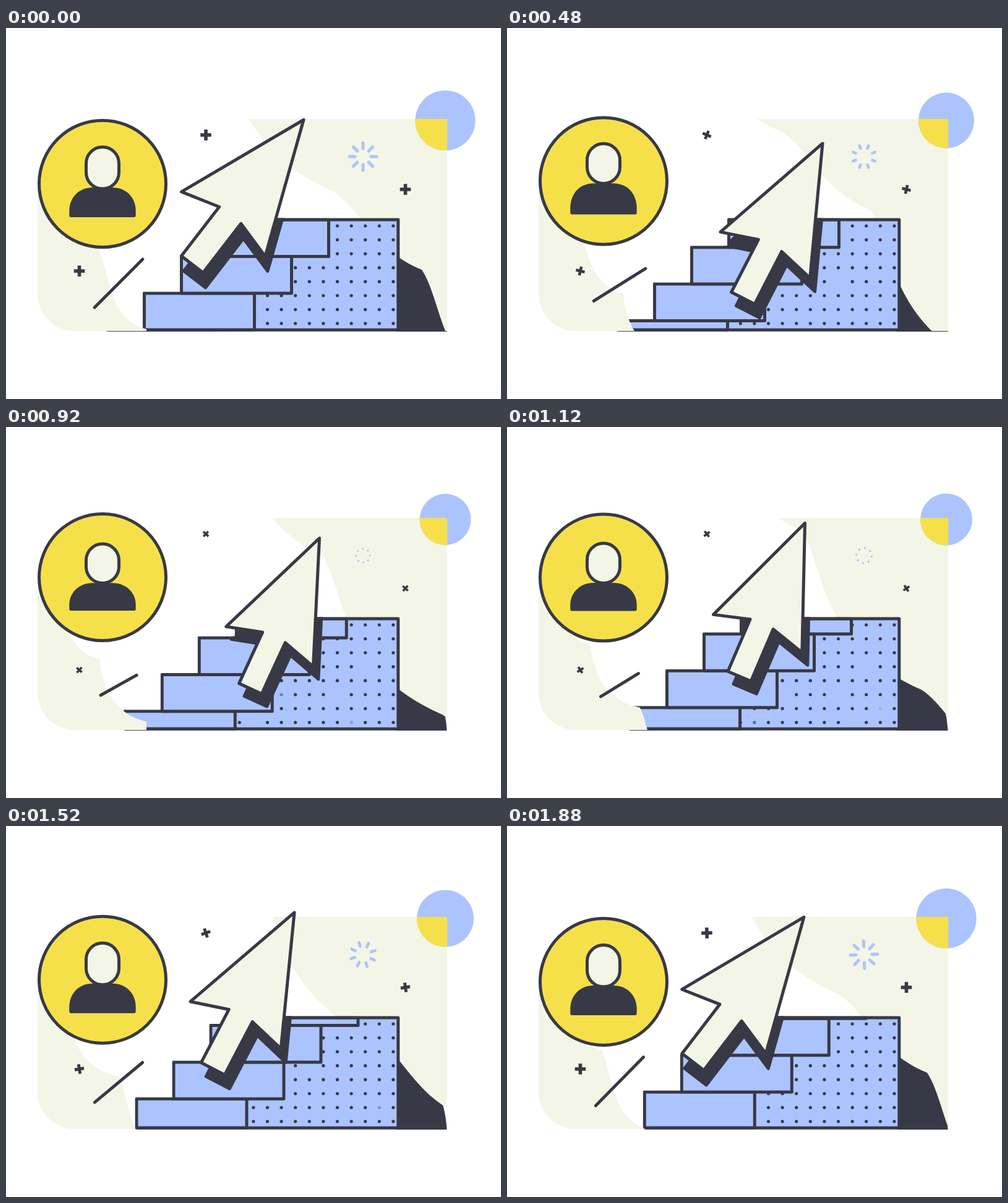
Write an HTML page with a canvas that moves like this. It is 800 px wide and 600 px high and loops after 1920 ms.

```html
<!DOCTYPE html>
<html lang="en">
<head>
<meta charset="utf-8">
<title>Climbing arrow</title>
<style>
  html, body { margin: 0; width: 100%; height: 100%; overflow: hidden; background: #fff; }
  canvas { display: block; }
</style>
</head>
<body>
<canvas id="stage" width="800" height="600"></canvas>
<script>
const ctx = document.getElementById('stage').getContext('2d');
const LOOP = 1920, LINE = 5, TURN = 2 * Math.PI;
const CREAM = '#f3f5e6', BLUE = '#abc4ff', YELLOW = '#f6e04a', DARK = '#383946';
const TOP = 310, BASE = 488.3, RIGHT = 633.8, RISE = 59.4;

let time = 0, phase = 0, wave = 1;

// Looping motion: a mean plus one slow and one fast swing.
const swing = (mean, c1, s1, c2, s2) => {
  const a = TURN * phase;
  return mean + c1 * Math.cos(a) + s1 * Math.sin(a) + c2 * Math.cos(2 * a) + s2 * Math.sin(2 * a);
};
const clamp = v => Math.max(0, Math.min(1, v));

function paint(fill, stroke, width = LINE) {
  if (fill) { ctx.fillStyle = fill; ctx.fill(); }
  if (stroke) { ctx.strokeStyle = stroke; ctx.lineWidth = width; ctx.stroke(); }
}

function disc(x, y, r, fill, stroke) {
  ctx.beginPath();
  ctx.arc(x, y, r, 0, TURN);
  paint(fill, stroke);
}

function line(x1, y1, x2, y2, color = DARK, width = LINE) {
  ctx.beginPath();
  ctx.moveTo(x1, y1);
  ctx.lineTo(x2, y2);
  paint(null, color, width);
}

function isolated(draw) {
  ctx.save();
  draw();
  ctx.restore();
}

// Ground with a scalloped edge that slides up and left by two scallops per loop.
// Each scallop is a cubic curve relative to its start; farX is the filled side.
function ground(x, y, scallops, farX) {
  const dx = scallops[0][4] + scallops[1][4], dy = scallops[0][5] + scallops[1][5];
  x -= dx * (phase + 1);
  y -= dy * (phase + 1);
  ctx.beginPath();
  ctx.moveTo(farX, y);
  ctx.lineTo(x, y);
  for (let i = 0; i < 6; i++) {
    const [ax, ay, bx, by, ex, ey] = scallops[i % 2];
    ctx.bezierCurveTo(x + ax, y + ay, x + bx, y + by, x + ex, y + ey);
    x += ex;
    y += ey;
  }
  ctx.lineTo(farX, y);
  paint(CREAM);
}

function rightGround() {
  // The dark dome shows wherever the cream leaves it bare.
  ctx.beginPath();
  ctx.moveTo(630, 491);
  ctx.lineTo(630, 360);
  ctx.bezierCurveTo(680, 383, 709, 430, 712.5, 491);
  paint(DARK);
  isolated(() => {
    ctx.beginPath();
    ctx.rect(300, 147, 413, 343);
    ctx.clip();
    ground(530, 265, [[45, 30, 62, 93, 142, 126], [38, 58, 26, 184, 194, 258]], 1200);
  });
}

function leftGround() {
  isolated(() => {
    ctx.beginPath();
    ctx.roundRect(51, 250, 176, 240, [0, 0, 0, 60]);
    ctx.clip();
    ground(227, 487, [[5, 50, 25, 90, 80, 102], [20, 40, 15, 114, 78, 130]], -300);
  });
}

function cornerDisc() {
  const r = 45 + 3.6 * wave;
  disc(710, 149.5, r, BLUE);
  isolated(() => {
    ctx.beginPath();
    ctx.rect(600, 147, 113, 100);
    ctx.clip();
    disc(710, 149.5, r, YELLOW);
  });
}

function spinner() {
  const grow = 1 - ((1 - wave) / 2) ** 2;
  const outer = 12.5 + 12 * grow, inner = outer - 3.1 - 11 * grow * grow;
  const cap = 1.5 + grow;
  isolated(() => {
    ctx.translate(577, 208);
    ctx.rotate(phase * TURN / 4);
    for (let i = 0; i < 8; i++) {
      line(inner + cap, 0, outer - cap, 0, BLUE, 2 * cap);
      ctx.rotate(TURN / 8);
    }
  });
}

function plus(x, y, turn) {
  isolated(() => {
    const s = .82 + .18 * wave;
    ctx.translate(x, y);
    ctx.rotate(turn * TURN / 4);
    ctx.scale(s, s);
    ctx.lineCap = 'butt';
    line(-8.8, 0, 8.8, 0, DARK, 5.6);
    line(0, -8.8, 0, 8.8, DARK, 5.6);
  });
}

const steps = () => [0, 1, 2, 3].map(k => {
  const y = BASE - RISE * (k + phase);
  return { x: 163.5 + 60 * (k + phase), top: Math.max(TOP, y), bottom: Math.min(BASE, y + RISE) };
});

function clipToStairs() {
  ctx.beginPath();
  for (const s of steps()) ctx.rect(s.x - 2.5, s.top - 2.5, RIGHT + 5 - s.x, BASE + 5 - s.top);
  ctx.clip();
}

// A fixed grid of dots; a few chosen by a seeded generator blink once per loop.
function dots() {
  let seed = 11;
  const random = () => (seed = seed * 16807 % 2147483647) / 2147483647;
  for (let i = -2; i < 10; i++) for (let j = 0; j < 8; j++) {
    const blinks = random() < .15, middle = 400 + 1150 * random();
    ctx.globalAlpha = blinks ? clamp((Math.abs(time - middle) - 150) / 200) : 1;
    disc(422.5 + 22.6 * i, 320 + 22.55 * j, 2.6, DARK);
  }
  ctx.globalAlpha = 1;
}

function stairs() {
  const all = steps();
  isolated(() => {
    clipToStairs();
    ctx.fillStyle = BLUE;
    ctx.fillRect(0, TOP, RIGHT, BASE - TOP);
    dots();
    for (const s of all) {
      ctx.beginPath();
      ctx.rect(s.x, s.top, 178, s.bottom - s.top);
      paint(BLUE, DARK);
    }
  });
  ctx.beginPath();
  ctx.moveTo(all[3].x, TOP);
  ctx.lineTo(RIGHT, TOP);
  ctx.lineTo(RIGHT, BASE);
  ctx.lineTo(all[0].x + 2, BASE);
  paint(null, DARK);
}

function avatar() {
  const cy = 247.5 + 4.5 * wave;
  // One hop in the middle of the loop, with a squash at both ends of it.
  const hop = -Math.sin(TURN * clamp((time - 400) / 800));
  const squash = 2.5 * Math.abs(hop);
  const headTop = cy - 59.5 + 4.2 * hop + squash, headBottom = cy + 8 + 4.2 * hop - squash;
  const top = cy + 6 + 4 * hop, bottom = cy + 54;
  disc(156, cy, 102.5, YELLOW, DARK);

  ctx.beginPath();
  ctx.moveTo(105, bottom);
  ctx.quadraticCurveTo(102.3, bottom, 102.3, bottom - 3);
  ctx.lineTo(102.3, bottom - 10);
  ctx.bezierCurveTo(102.3, top + 16, 118, top, 140, top);
  ctx.lineTo(172, top);
  ctx.bezierCurveTo(194, top, 209.7, top + 16, 209.7, bottom - 10);
  ctx.lineTo(209.7, bottom - 3);
  ctx.quadraticCurveTo(209.7, bottom, 207, bottom);
  paint(DARK);

  ctx.beginPath();
  ctx.roundRect(129.5, headTop, 53, headBottom - headTop, 26.5);
  paint(CREAM, DARK);
}

function slash() {
  const y = 415.3 - 2.3 * wave;
  const dx = swing(36.8, 5.1, 1.9, -3, .5), dy = swing(27.7, 11.4, -1.6, 0, 0);
  line(182 - dx, y + dy, 182 + dx, y - dy);
}

// Drawn along the x axis from its tip, then turned to point up and right.
function arrow(fill, du = 0, dv = 0) {
  const half = [[213, 85.5], [195, 22.2], [295.5, 22.2]];
  const outline = [[0, 0], ...half, ...half.toReversed().map(([u, v]) => [u, -v])];
  const s = (218.5 + 10.7 * wave) / 229.5;
  isolated(() => {
    ctx.translate(swing(489.2, -10.4, 23, 2.2, -7.3), swing(162.3, -13.2, 23.8, -.6, -7));
    ctx.rotate((90 + swing(28.6, 6.6, 1, 2.4, -.5)) * TURN / 360);
    ctx.scale(s, s);
    ctx.beginPath();
    for (const [u, v] of outline) ctx.lineTo(u + du, v + dv);
    ctx.closePath();
    paint(fill, DARK, LINE / s);
  });
}

function draw(now) {
  time = Math.floor(now % LOOP / 40) * 40;
  phase = time / LOOP;
  wave = Math.cos(TURN * phase);
  const eased = (1 - Math.cos(Math.PI * phase)) / 2;
  ctx.clearRect(0, 0, 800, 600);
  ctx.lineCap = ctx.lineJoin = 'round';

  rightGround();
  cornerDisc();
  spinner();
  plus(323, 173, phase);
  plus(645.5, 261, eased);
  stairs();
  isolated(() => {
    clipToStairs();
    arrow(DARK, 16.7, -17.9);
  });
  leftGround();
  plus(118.5, 393, eased);
  avatar();
  slash();
  arrow(CREAM);
  requestAnimationFrame(draw);
}
draw(0);
</script>
</body>
</html>
```
